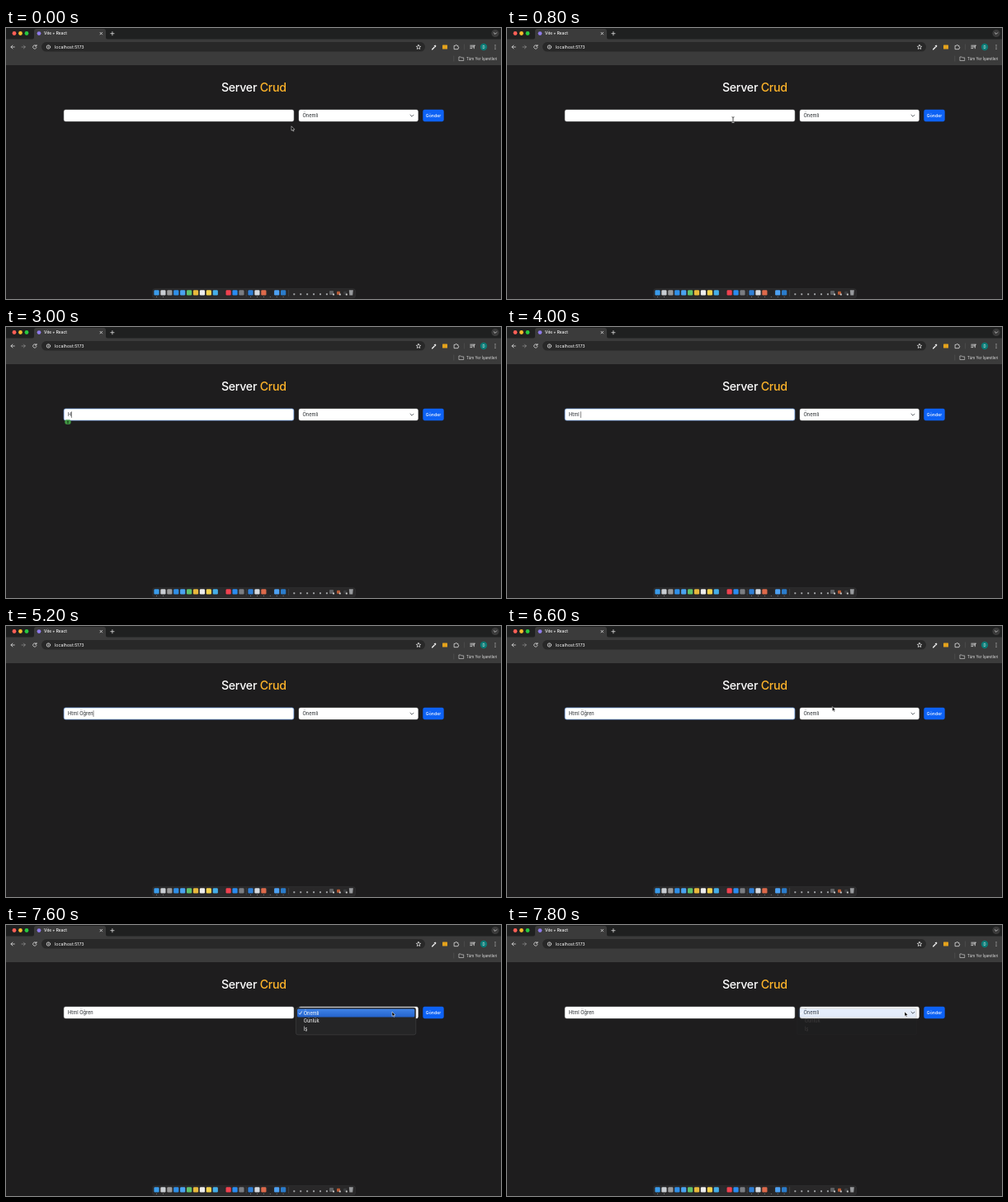
These frames come from a looping animation (600 by 328 pixels, 8 s). An HTML page:

```html
<!DOCTYPE html>
<html lang="tr">
<head>
<meta charset="utf-8">
<title>Server Crud</title>
<style>
html, body { margin: 0; width: 100%; height: 100%; overflow: hidden; background: #1e1d1e; }
svg { display: block; width: 600px; height: 328px; font-family: Inter, "Open Sans", sans-serif; }
text { white-space: pre; font-size: 5.7px; fill: #fff; }
.line { fill: none; stroke: #dedede; stroke-width: .8; stroke-linecap: round; stroke-linejoin: round; }
.field { fill: #fff; stroke: #dee2e6; stroke-width: .4; }
.field.focus { stroke: #86b7fe; stroke-width: .7; }
.ink { fill: #212529; }
</style>
</head>
<body>
<svg viewBox="0 0 600 328">
  <defs>
    <linearGradient id="blue" x2="0" y2="1">
      <stop stop-color="#3f83e6"/><stop offset="1" stop-color="#2463cc"/>
    </linearGradient>
  </defs>

  <!-- browser: tabs, toolbar, bookmarks -->
  <rect width="600" height="14" fill="#1f2020"/>
  <rect y="13.5" width="600" height="31.5" fill="#3b3b3b"/>
  <path d="M31 14q3 0 3-3V4q0-3 3-3h81q3 0 3 3v7q0 3 3 3z" fill="#3b3b3b"/>
  <circle cx="10" cy="6.5" r="2.4" fill="#ff5f57"/>
  <circle cx="17.5" cy="6.5" r="2.4" fill="#febc2e"/>
  <circle cx="25" cy="6.5" r="2.4" fill="#28c840"/>
  <circle cx="40" cy="6.6" r="2.4" fill="#8f7bea"/>
  <text x="46" y="8.4" style="font-size:4.8px;font-weight:500">Vite + React</text>
  <path class="line" d="M114 5.3l2.6 2.6m0-2.6L114 7.9M126.8 6.7h4.2m-2.1-2.1v4.2"/>
  <circle cx="593" cy="6.5" r="4.6" fill="#3b3b3b"/>
  <path class="line" d="M591.4 5.8l1.6 1.6 1.6-1.6"/>

  <rect x="43" y="17" width="465" height="11.6" rx="5.8" fill="#282828"/>
  <path class="line" d="M10.3 23H6m2-2l-2 2 2 2"/>
  <path class="line" d="M19 23h4.3m-2-2l2 2-2 2" stroke-opacity=".45"/>
  <path class="line" d="M36.6 21.6a2.2 2.2 0 1 0 .4 2M37 20.4v1.6h-1.6"/>
  <circle class="line" cx="51.4" cy="23" r="2.2"/>
  <path class="line" d="M51.4 22.9v1M51.4 21.8v.05"/>
  <text x="59" y="25" style="font-size:5.3px">localhost:5173</text>
  <path class="line" stroke-width=".6" d="M500 20.4l.8 1.7 1.9.2-1.4 1.3.4 1.9-1.7-1-1.7 1 .4-1.9-1.4-1.3 1.9-.2z"/>
  <path d="M516 25.4l3-3 1 1-3 3h-1zM518.6 21.4l2 2 .9-1.6-1.2-1.2z" fill="#eee"/>
  <rect x="529" y="20.5" width="6" height="5" rx=".6" fill="#e3a21c"/>
  <path class="line" d="M543.5 21.4h1.3a.9.9 0 0 1 1.8 0h1.3v1.5a.9.9 0 0 1 0 1.8v1h-4.4z"/>
  <path d="M555.5 19.5v7" stroke="#555" stroke-width=".6"/>
  <path class="line" d="M562.8 21.2h4.4m-4.4 1.7h4.4m-4.4 1.7h2m2.5.2v-3.6h1.2"/>
  <circle cx="579" cy="23" r="4.2" fill="#0b7a75"/>
  <text x="579" y="24.6" text-anchor="middle" style="font-size:4.2px">D</text>
  <path class="line" d="M593 20.9v.05M593 23v.05M593 25.1v.05" style="stroke-width:1.1"/>
  <path d="M542.8 33.5v7" stroke="#5a5a5a" stroke-width=".6"/>
  <path class="line" d="M549.3 35h2l.8.9h2.6v3.6h-5.4z" style="stroke-width:.6"/>
  <text x="558" y="38.6" style="font-size:4.5px;fill:#e3e3e3">Tüm Yer İşaretleri</text>

  <!-- page -->
  <text x="300.3" y="77.2" text-anchor="middle" style="font-size:14.2px;font-weight:500;letter-spacing:-.02em">Server <tspan fill="#ffb52a">Crud</tspan></text>
  <rect id="input" class="field" x="70.2" y="99" width="278.6" height="14" rx="2.1"/>
  <text id="typed" class="ink" x="75" y="108.1"></text>
  <path id="caret" d="M0 102.3v7.6" stroke="#111" stroke-width=".5"/>
  <rect class="field" x="355" y="99" width="144.5" height="14" rx="2.1"/>
  <text class="ink" x="359.5" y="108.1">Önemli</text>
  <rect x="505.3" y="98.8" width="25.4" height="14.4" rx="2.1" fill="#0d62f5"/>
  <text x="518" y="108" text-anchor="middle" style="font-size:5.2px;font-weight:500">Gönder</text>

  <g id="menu">
    <rect x="351.4" y="100" width="145.4" height="32.8" rx="2.4" fill="#252526" stroke="#4a4a4c" stroke-width=".5"/>
    <rect x="353" y="101.6" width="142.3" height="9.9" rx="1.5" fill="url(#blue)"/>
    <path class="line" d="M355.2 106.8l1.2 1.4 2-3.4" style="stroke:#fff"/>
    <text x="360.7" y="108.5">Önemli</text>
    <text x="360.7" y="118.4">Günlük</text>
    <text x="360.7" y="128.3">İş</text>
  </g>
  <path id="chevron" class="line" d="M490 105.2l2 2 2-2" style="stroke:#343a40"/>

  <g id="badge">
    <rect x="-6" y="-4.4" width="12" height="8.8" rx="3.2" fill="#439a45"/>
    <path d="M0-2.8L2.6 0H1.2v1.2h-2.4V0h-1.4zM-1.2 1.8h2.4v1h-2.4z" fill="#1d4420"/>
  </g>

  <!-- dock -->
  <rect x="177.5" y="315.5" width="246" height="11.5" rx="3" fill="#292829" stroke="#39383a" stroke-width=".4"/>
  <g id="dock"></g>

  <path id="arrow" d="M0 0v5.4l1.2-1.1.8 1.9 1-.4-.8-1.8h1.7z" fill="#000" stroke="#fff" stroke-width=".5"/>
  <g id="beam" fill="none">
    <path d="M-1.5-3.3q1.5 0 1.5 1v4.6q0 1-1.5 1M1.5-3.3q-1.5 0-1.5 1M0 2.3q0 1 1.5 1" stroke="#ccc" stroke-width="1.3"/>
    <path d="M-1.5-3.3q1.5 0 1.5 1v4.6q0 1-1.5 1M1.5-3.3q-1.5 0-1.5 1M0 2.3q0 1 1.5 1" stroke="#222" stroke-width=".6"/>
  </g>
</svg>
<script>
const LOOP = 8000, STEP = 200;
const $ = id => document.getElementById(id);
const show = (el, on) => el.setAttribute("opacity", +on);
const place = (el, x, y, s = 1) => el.setAttribute("transform", `translate(${x} ${y}) scale(${s})`);

// dock: [first x, colours]
const groups = [
  [182.5, "#3a9bea #c9cdd2 #9a9a9a #2f8fe8 #4aa3f0 #5fc16a #e8b83c #ececec #f2d14c #45aee8 #2b2b2e #f0414f #2a8cf0 #7b7d82"],
  [296.5, "#2f7fd6 #d5d9de #dd6a4b #242426 #4da0f2 #2b7ccb"]
];
const box = (x, y, w, fill) => `<rect x="${x - w / 2}" y="${y - w / 2}" width="${w}" height="${w}" rx="${w / 5}" fill="${fill}"/>`;
let dock = "";
for (const [x, colours] of groups)
  colours.split(" ").forEach((c, i) => {
    const cx = x + i * 7.92;
    dock += box(cx, 320.4, 6.2, c);
    if (x > 290 || i < 2) dock += box(cx, 325.4, .8, "#aaa");
  });
for (let i = 0; i < 6; i++) dock += box(349.3 + i * 7.92, 322.2, 2, "#a5a7aa");
dock += box(394.5, 320.6, 5, "#5d5f62") + box(397, 322.4, 2, "#ccc")
  + box(403, 320.8, 4, "#b65a35") + box(404.8, 322.4, 2, "#ccc")
  + box(411, 320.8, 4, "#3a3b3d") + box(412.8, 322.4, 2, "#ccc")
  + `<path d="M415.8 317.3h5l-.6 6.2h-3.8z" fill="#97999c"/>`
  + `<path d="M291.2 317v8M342.6 317v8" stroke="#555" stroke-width=".5"/>`;
$("dock").innerHTML = dock;

// pointer keys: time, x, y
const path = [
  [0, 346, 118.8], [200, 342, 118], [400, 322, 115], [600, 292, 111.5], [800, 274, 111],
  [5600, 274, 111], [5800, 278, 110], [6000, 308, 104], [6200, 350, 97], [6400, 382, 94],
  [6600, 394.3, 97.6], [6800, 396, 101], [7000, 397, 102.8], [7200, 397, 102.8],
  [7400, 428, 104], [7600, 468, 105], [7800, 482, 105]
];
function pointer(t) {
  const i = path.findIndex(k => k[0] > t);
  if (i < 0) return path.at(-1).slice(1);
  const [a, b] = [path[i - 1], path[i]], p = (t - a[0]) / (b[0] - a[0]);
  return [1, 2].map(n => a[n] + (b[n] - a[n]) * p);
}

// value of the last [time, value] key reached
const at = (keys, t) => keys.reduce((v, [time, next]) => t >= time ? next : v, 0);
const phrase = "Html Öğren";
const typing = [[2600, 1], [3600, 2], [3800, 4], [4000, 5], [4400, 6], [4800, 7], [5000, 9], [5200, 10]];
const blink = [[1000, 1], [1400, 0], [1800, 1], [2200, 0], [2600, 1], [5600, 0], [6200, 1], [6600, 0]];
const badgeSize = [[2200, .8], [2400, 1], [3000, .6], [3200, 0]];
const menuFade = [[7000, 1], [7800, .13]];

function draw(now) {
  const t = Math.floor(now % LOOP / STEP) * STEP;
  const typed = $("typed");
  typed.textContent = phrase.slice(0, at(typing, t));
  place($("caret"), 75.3 + typed.getComputedTextLength(), 0);
  show($("caret"), at(blink, t));
  $("input").classList.toggle("focus", t >= 1000 && t < 6800);

  place($("badge"), 75, 115, at(badgeSize, t));
  const fade = at(menuFade, t);
  show($("menu"), fade);
  show($("chevron"), fade < 1);

  const [x, y] = pointer(t);
  const inField = x < 349 && y > 99 && y < 113;
  const hidden = t >= 2600 && t < 5800;
  place($("arrow"), x, y);
  place($("beam"), x, y);
  show($("arrow"), !hidden && !inField);
  show($("beam"), !hidden && inField);
  requestAnimationFrame(draw);
}
requestAnimationFrame(draw);
</script>
</body>
</html>
```
